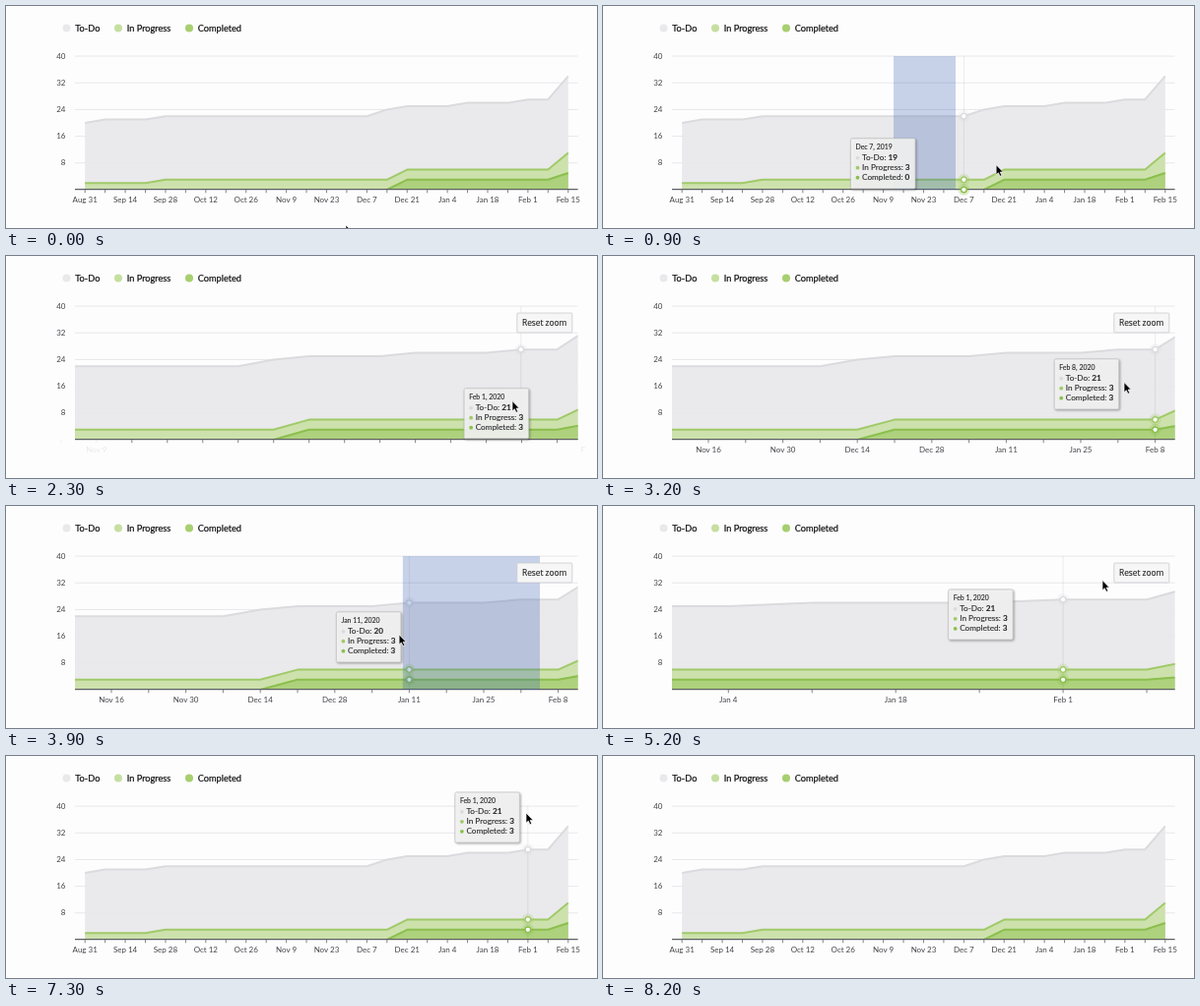
Write an HTML page that moves like this. It is 600 by 226 pixels and loops after 8700 ms.

```html
<!DOCTYPE html>
<html lang="en">
<head>
<meta charset="utf-8">
<title>Zoomable area chart</title>
<style>
  html, body { margin: 0; width: 100%; height: 100%; overflow: hidden; background: #fefdfe; }
  svg { display: block; width: 600px; height: 226px; font-family: Lato, sans-serif; }
  .axis { font-size: 8px; fill: #444448; }
  .legend { font-size: 9.2px; fill: #111; stroke: #111; stroke-width: .22px; }
  .tip { font-size: 8.2px; }
  .tip text { fill: #2a2a2c; stroke: #2a2a2c; stroke-width: .12px; }
  .tip .date { font-size: 6.9px; }
  .tip tspan { font-weight: 700; }
  .tip rect { filter: drop-shadow(1px 1px 1px rgba(0, 0, 0, .35)); }
  .button { font: 500 8.3px "Open Sans", sans-serif; fill: #222; stroke: #222; stroke-width: .15px; }
</style>
</head>
<body>
<svg id="stage" viewBox="0 0 600 226"></svg>
<script>
const LOOP = 8700, STEP = 100, ZOOM_MS = 500, LAG = 100;
const LEFT = 70, RIGHT = 580.6, TOP = 51, BASE = 187;
const WEEKS = 25, DAY = 864e5, START = Date.UTC(2019, 7, 31);
const HOVER_ON = 300, CURSOR_OFF = 7400, HOVER_OFF = 7800, TIP_OFF = 8200;

// Stacked upper edges: first value, then the rise reached in each listed week
const series = [
  { name: 'To-Do', fill: '#e9e8ea', line: '#dbdbde', dot: '#e9e9eb', legendX: 61.5,
    first: 20, rises: { 1: 1, 4: 1, 15: 2, 16: 1, 19: 1, 22: 1, 24: 7 } },
  { name: 'In Progress', fill: '#cbe1a9', line: '#a0ca69', dot: '#c6dfa0', legendX: 114,
    first: 2, rises: { 4: 1, 16: 3, 24: 5 } },
  { name: 'Completed', fill: '#acd17a', line: '#8bbf4d', dot: '#a7cf70', legendX: 186,
    first: 0, rises: { 16: 3, 24: 2 } }
];
for (const s of series) {
  let v = s.first;
  s.values = Array.from({ length: WEEKS }, (_, i) => v += s.rises[i] || 0);
}

// A horizontal scale: one known week, its x, and the width of a week
function scale(week, x, w) {
  const x0 = x - week * w;
  return { x0, w, lo: Math.ceil((LEFT - x0) / w), hi: Math.floor((RIGHT - x0) / w) };
}
const full = scale(0, 80.2, 20.44), near = scale(11, 107, 37.8), close = scale(18, 127.3, 84.95);
const zooms = [
  { at: 0, from: full, to: full },
  { press: 500, at: 1905, from: full, to: near },
  { press: 3100, at: 4500, from: near, to: close },
  { at: 6480, from: close, to: full }
];

const path = [
  [0, 345, 223], [500, 295, 160], [1400, 547, 164], [1900, 551, 168], [2300, 514, 147.6],
  [3100, 542, 128], [3600, 406, 134], [4700, 366, 116], [5200, 507, 75.6], [6200, 545, 65.7],
  [7300, 528, 58]
];

const ease = u => (1 - Math.cos(Math.PI * u)) / 2;
const clamp = (v, lo = 0, hi = 1) => Math.max(lo, Math.min(hi, v));
const lerp = (a, b, u) => a + (b - a) * u;
const yOf = v => BASE - v * 3.4;
const xOf = (view, i) => view.x0 + view.w * i;
const zoomAt = t => zooms.filter(z => z.at <= Math.max(0, t)).pop();

function cursorAt(t) {
  const n = path.findIndex(k => k[0] > t);
  if (n < 1) return path[n < 0 ? path.length - 1 : 0].slice(1);
  const [a, b] = [path[n - 1], path[n]];
  const u = ease((t - a[0]) / (b[0] - a[0]));
  return [lerp(a[1], b[1], u), lerp(a[2], b[2], u)];
}

// The week nearest to the slightly delayed pointer
function hoverAt(t) {
  const { to } = zoomAt(t - LAG);
  return clamp(Math.round((cursorAt(t - LAG)[0] - to.x0) / to.w), to.lo, to.hi);
}

// The tooltip trails its resting place: left of the point, below the button
function tipAt(t) {
  const trail = 4;
  let x = 0, y = 0;
  for (let k = 0; k < trail; k++) {
    const s = t - k * STEP, { to } = zoomAt(s - LAG);
    x += xOf(to, hoverAt(s)) - 74;
    y += Math.max(cursorAt(s - LAG)[1] - 25.5, to === full ? 37 : 84.5);
  }
  return [x / trail, y / trail];
}

function dateText(i, year) {
  const opts = { month: 'short', day: 'numeric', timeZone: 'UTC' };
  if (year) opts.year = 'numeric';
  return new Date(START + i * 7 * DAY).toLocaleDateString('en-US', opts);
}

function set(node, attrs) {
  for (const k in attrs) node.setAttribute(k, attrs[k]);
  return node;
}
function add(parent, tag, attrs = {}, text) {
  const node = document.createElementNS('http://www.w3.org/2000/svg', tag);
  if (text !== undefined) node.textContent = text;
  return parent.appendChild(set(node, attrs));
}
const show = (node, on) => set(node, { visibility: on ? 'visible' : 'hidden' });

const stage = document.getElementById('stage');
const defs = add(stage, 'defs');
function clip(id, x, y, width, height) {
  add(add(defs, 'clipPath', { id }), 'rect', { x, y, width, height });
}
clip('plot', LEFT, TOP - 3, RIGHT - LEFT, BASE - TOP + 3);
clip('chart', 49, 0, 539, 226);

// Grid, value labels, legend
for (let v = 8; v <= 40; v += 8) {
  add(stage, 'path', { d: `M${LEFT} ${yOf(v)}H${RIGHT}`, stroke: '#e7e7ea' });
  add(stage, 'text', { class: 'axis', x: 60.5, y: yOf(v) + 2.5, 'text-anchor': 'end' }, v);
}
for (const s of series) {
  add(stage, 'circle', { cx: s.legendX, cy: 22.5, r: 4, fill: s.dot });
  add(stage, 'text', { class: 'legend', x: s.legendX + 8.8, y: 25.6 }, s.name);
}

// Areas, crosshair, lines
const plot = add(stage, 'g', { 'clip-path': 'url(#plot)' });
for (const s of series) s.area = add(plot, 'path', { fill: s.fill, 'fill-opacity': .94 });
const cross = add(plot, 'path', { stroke: '#000', 'stroke-opacity': .07 });
for (const s of series) {
  s.edge = add(plot, 'path', { fill: 'none', stroke: s.line, 'stroke-width': 2, 'stroke-linejoin': 'round' });
}

// Horizontal axis
add(stage, 'path', { d: `M${LEFT} ${BASE - .4}H${RIGHT}`, stroke: '#5c6062', 'stroke-width': 1.2 });
const axis = add(stage, 'g', { 'clip-path': 'url(#chart)' });
const ticks = Array.from({ length: WEEKS }, (_, i) => {
  const g = add(axis, 'g');
  return {
    g,
    mark: add(g, 'path', { d: `M0 ${BASE}v3.3`, stroke: '#77797d', 'stroke-width': .9 }),
    label: add(g, 'text', { class: 'axis', y: 199.6, 'text-anchor': 'middle' }, dateText(i))
  };
});

const markers = add(stage, 'g');
for (const s of series) {
  s.halo = add(markers, 'circle', { r: 6, fill: s.line, 'fill-opacity': .25 });
  s.ring = add(markers, 'circle', { r: 2.8, fill: '#fff', stroke: s.line, 'stroke-width': 1.4 });
}

const band = add(stage, 'rect', { y: TOP, height: BASE - TOP, fill: '#335cad', 'fill-opacity': .27 });

const button = add(stage, 'g');
add(button, 'rect', { x: 518.8, y: 58, width: 56, height: 20, rx: 1, fill: '#f6f6f7', stroke: '#c9c9cc', 'stroke-width': .8 });
add(button, 'text', { class: 'button', x: 546.6, y: 70.8, 'text-anchor': 'middle' }, 'Reset zoom');

const tip = add(stage, 'g', { class: 'tip' });
add(tip, 'rect', { width: 65.5, height: 51, rx: 1.5, fill: '#f7f7f7', 'fill-opacity': .9, stroke: '#c3c3c6', 'stroke-width': .8 });
const tipDate = add(tip, 'text', { class: 'date', x: 5, y: 10.8 });
series.forEach((s, n) => {
  const y = 22.4 + n * 10;
  add(tip, 'circle', { cx: 7, cy: y - 2.6, r: 1.9, fill: s.line });
  const row = add(tip, 'text', { x: 11.6, y }, s.name + ': ');
  s.count = add(row, 'tspan');
});

const cursor = add(stage, 'path', {
  d: 'M0 0V10.2L2.3 8.1 3.9 11.7 5.7 10.9 4.1 7.4H7.2Z',
  fill: '#000', stroke: '#fff', 'stroke-width': .7
});

// Kept ticks slide, others fade; labels that change parity switch at the ends
function drawTicks(from, to, p, view) {
  const inside = (v, i) => i >= v.lo && i <= v.hi;
  const labelled = (v, i) => inside(v, i) && (i - v.lo) % 2 === 0;
  ticks.forEach(({ g, mark, label }, i) => {
    const a = inside(from, i), b = inside(to, i), x = xOf(view, i);
    set(g, { opacity: a && b ? 1 : a ? 1 - p : b ? p : 0 });
    set(mark, { transform: `translate(${x} 0)` });
    set(label, { x });
    const wasOn = labelled(from, i), isOn = labelled(to, i);
    let on = wasOn && isOn;
    if (wasOn && !isOn) on = !b || p === 0;
    if (isOn && !wasOn) on = !a || p > .985;
    label.style.display = on ? '' : 'none';
  });
}

function drawHover(t, to) {
  const on = t >= HOVER_ON && t < HOVER_OFF;
  const week = hoverAt(t), x = xOf(to, week);
  show(markers, on);
  show(set(cross, { d: `M${x} ${TOP}V${BASE}` }), on);
  tipDate.textContent = dateText(week, true);
  series.forEach((s, n) => {
    const v = s.values[week], below = series[n + 1] ? series[n + 1].values[week] : 0;
    for (const c of [s.halo, s.ring]) set(c, { cx: x, cy: yOf(v) });
    s.count.textContent = v - below;
  });
  show(tip, t >= HOVER_ON && t < TIP_OFF);
  set(tip, { transform: `translate(${tipAt(t)})`, opacity: clamp((TIP_OFF - t) / 300) });
}

function draw(t) {
  const { at, from, to } = zoomAt(t);
  const p = ease(clamp((t - at) / ZOOM_MS));
  const view = { x0: lerp(from.x0, to.x0, p), w: lerp(from.w, to.w, p) };
  drawTicks(from, to, p, view);
  for (const s of series) {
    const d = 'M' + s.values.map((v, i) => `${xOf(view, i)} ${yOf(v)}`).join('L');
    set(s.edge, { d });
    set(s.area, { d: `${d}V${BASE}H${xOf(view, 0)}Z` });
  }
  drawHover(t, to);

  const drag = zooms.find(z => t > z.press && t < z.at);
  show(band, drag);
  if (drag) {
    const a = cursorAt(drag.press)[0], b = cursorAt(t - LAG)[0];
    set(band, { x: Math.min(a, b), width: Math.abs(b - a) });
  }

  show(button, to !== full);
  show(set(cursor, { transform: `translate(${cursorAt(t)})` }), t < CURSOR_OFF);
}

const began = performance.now();
function frame() {
  const t = (performance.now() - began) % LOOP;
  draw(Math.floor(t / STEP) * STEP);
  requestAnimationFrame(frame);
}
frame();
</script>
</body>
</html>
```
